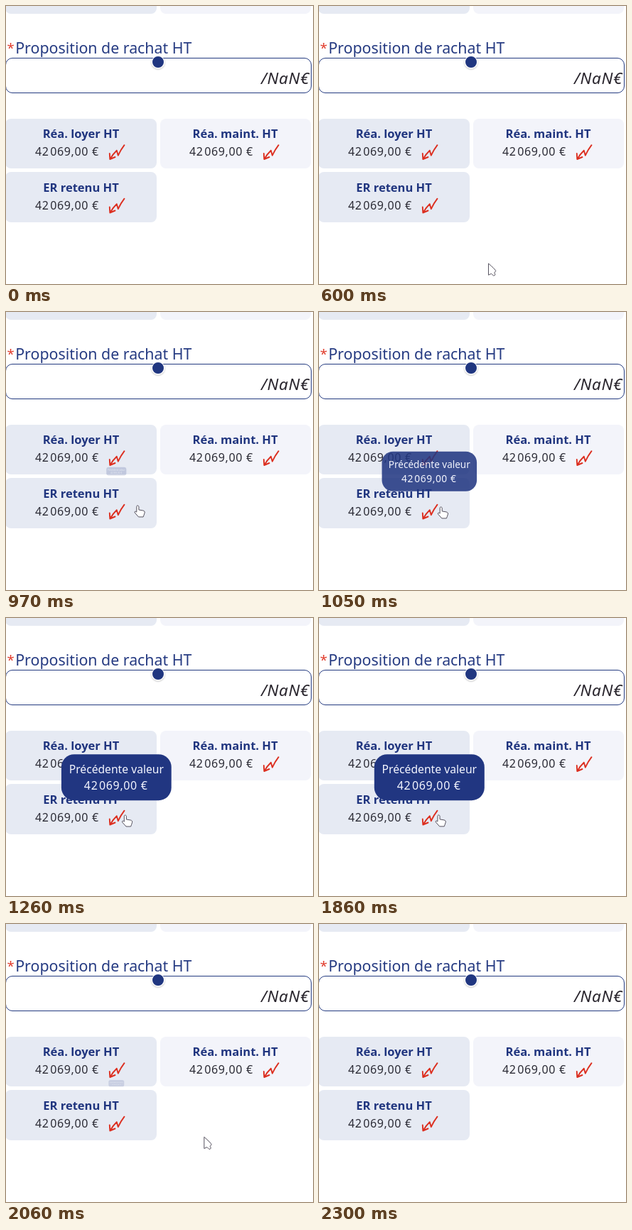
These frames come from a looping animation (432x392 px, 3.11 s). An HTML page:

```html
<!DOCTYPE html>
<html lang="fr">
<head>
<meta charset="utf-8">
<style>
  html, body { margin: 0; width: 100%; height: 100%; overflow: hidden; background: #fff; }
  svg { display: block; font-family: "Noto Sans", "Open Sans", sans-serif; }
  .head { font-size: 16.5px; font-weight: 700; fill: #20357f; text-anchor: middle; }
  .value { font-size: 16px; letter-spacing: .65px; fill: #2b2b35; }
  .dark { fill: #e6eaf3; }
  .light { fill: #f3f4fa; }
  #tip text { fill: #f4f6ff; font-size: 15.7px; font-weight: 500; }
  #tip .value { font-size: 16px; }
  #mouse { fill: #fff; stroke: #55515e; stroke-linejoin: round; }
</style>
</head>
<body>
<svg width="432" height="392" viewBox="0 0 432 392">
  <defs>
    <g id="trend" fill="none" stroke="#dc2f20" stroke-width="1.9" stroke-linecap="round" stroke-linejoin="round">
      <path d="M21.5 .5Q16.5 7 12.8 15L10.8 8Q5.5 13 1.5 20M.8 12.3L1.3 20.3L8.5 17.3"/>
    </g>
    <filter id="soft" x="-50%" y="-50%" width="200%" height="200%">
      <feDropShadow dx="0" dy="1" stdDeviation="1" flood-opacity=".28"/>
    </filter>
  </defs>

  <rect class="dark" x="-1" y="-59" width="213" height="70" rx="8"/>
  <rect class="light" x="217" y="-59" width="212" height="70" rx="8"/>

  <text x="1.5" y="66" font-size="18.5" fill="#e03a2a">*</text>
  <text x="13.2" y="67" font-size="21.35" fill="#263b82">Proposition de rachat HT</text>
  <rect x="-.5" y="73.5" width="430" height="49" rx="9.5" fill="#fff" stroke="#233a80"/>
  <circle cx="214" cy="79" r="9.3" fill="#fff" filter="url(#soft)"/>
  <circle cx="214" cy="79" r="8" fill="#203680"/>
  <text x="427" y="110" font-size="22.5" font-style="italic" letter-spacing=".6" text-anchor="end" fill="#28242c">/NaN€</text>

  <g id="cards"></g>

  <g id="tip">
    <rect x="-77.5" y="-32.5" width="155" height="65" rx="18" fill="#213681"/>
    <text y="-5.5" text-anchor="middle">Précédente valeur</text>
    <text class="value" x="-45.5" y="17.5">42<tspan dx="1.6">069,00 €</tspan></text>
  </g>

  <g id="mouse">
    <path id="arrow" d="M.5 .5V16.8L4.6 14.8L7.6 17.8Q9.8 17.6 10 15.8L8.8 13.8L10.8 11Q9.8 8.6 .5 .5Z"/>
    <path id="hand" d="M4.6 1C5.8 1 6.4 1.8 6.4 2.8V7L12.3 8C14.2 8.4 14.9 9.5 14.6 11.2L13.6 14.3L12.6 17H6L.7 11C0 9.6 1.2 8.7 2.4 9.4L3.3 10.2V2.8C3.2 1.7 3.7 1 4.6 1Z"/>
  </g>
</svg>
<script>
const LOOP = 3110;
const byId = id => document.getElementById(id);

// The card's background snaps outward to whole pixels.
function card(x, y, title, tone) {
  const top = Math.floor(y), bottom = Math.ceil(y + 70);
  return `
  <g transform="translate(${x} ${y})">
    <rect class="${tone}" x="${x ? 0 : -1}" y="${top - y}" width="${x ? 212 : 213}" height="${bottom - top}" rx="8"/>
    <text class="head" x="105.5" y="27">${title}</text>
    <text class="value" x="41" y="52">42<tspan dx="1.6">069,00 €</tspan></text>
    <use href="#trend" x="145" y="36.7"/>
  </g>`;
}

byId("cards").innerHTML =
  card(0, 159, "Réa. loyer HT", "dark") +
  card(217, 159, "Réa. maint. HT", "light") +
  card(0, 234.5, "ER retenu HT", "dark");

const clamp = v => Math.min(1, Math.max(0, v));
const mix = (a, b, u) => a + (b - a) * u;

// De Casteljau's construction for any number of control points.
function bezier(points, u) {
  if (points.length === 1) return points[0];
  const inner = points.slice(1).map(([x, y], i) => [mix(points[i][0], x, u), mix(points[i][1], y, u)]);
  return bezier(inner, u);
}

const REST = [163, 277];
const enterPath = [[236.5, 363.5], [400, 260], [152, 266], REST];
const leavePath = [REST, [280, 254], [357, 393]];

function mouseAt(t) {
  if (t > 1860) return bezier(leavePath, clamp((t - 1860) / 370));
  const left = 1 - clamp((t - 600) / 660);
  return bezier(enterPath, 1 - left * left);
}

// The tooltip grows and shrinks exponentially.
const decay = (t, start) => Math.exp(-Math.max(0, t - start) / 45);
const tipSize = t => (1 - decay(t, 962)) * decay(t, 1973);

function draw(t) {
  const size = tipSize(t);
  byId("tip").setAttribute("transform", `translate(155.3 224.7) scale(${size})`);
  byId("tip").setAttribute("opacity", size);

  const [x, y] = mouseAt(t);
  const over = x < 212;
  byId("mouse").setAttribute("transform", `translate(${x} ${y})`);
  byId("mouse").style.display = t >= 600 && t < 2230 ? "" : "none";
  byId("hand").style.display = over ? "" : "none";
  byId("arrow").style.display = over ? "none" : "";
}

const start = performance.now();
function tick() {
  draw((performance.now() - start) % LOOP);
  requestAnimationFrame(tick);
}
tick();
</script>
</body>
</html>
```
